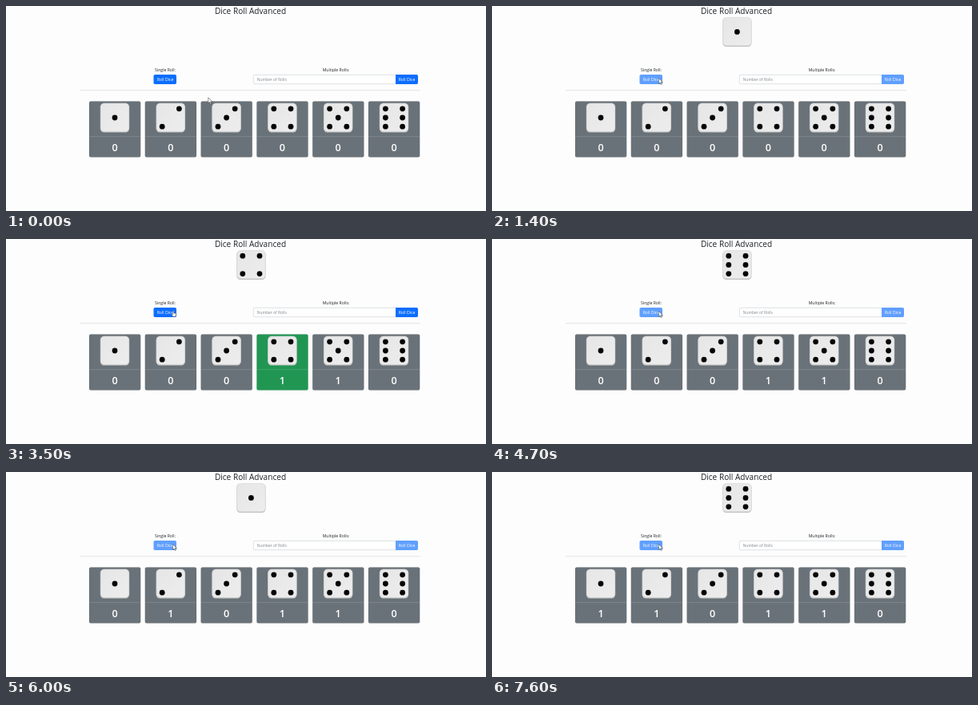
Animation of 600 by 257 pixels, one loop 7700 ms. Source, as an HTML page:

```html
<!DOCTYPE html>
<html lang="en">
<head>
<meta charset="utf-8">
<title>Dice Roll</title>
<style>
  html, body { margin: 0; width: 100%; height: 100%; overflow: hidden; background: #fdfdfd; }
  svg { display: block; font: 5.15px "Open Sans", "Noto Sans", sans-serif; }
  .mid { text-anchor: middle; }
  .title { font-size: 10.1px; font-weight: 500; }
  .count { font-size: 12.6px; font-weight: 600; fill: #fff; }
</style>
</head>
<body>
<svg id="stage" width="600" height="257" viewBox="0 0 600 257" fill="#212529">
  <defs>
    <linearGradient id="face" x1="0" y1="0" x2="1" y2="1">
      <stop offset="0" stop-color="#e6e6e6"/>
      <stop offset="1" stop-color="#ededed"/>
    </linearGradient>
  </defs>
  <text class="mid title" x="305.5" y="10">Dice Roll Advanced</text>
  <text class="mid" x="199" y="82">Single Roll:</text>
  <text class="mid" x="412.5" y="82">Multiple Rolls:</text>
  <g id="single">
    <rect x="184.5" y="86" width="28.5" height="12" rx="1.8"/>
    <text class="mid" x="199" y="94" fill="#fff">Roll Dice</text>
  </g>
  <path d="M487 86.3H311a1.7 1.7 0 0 0-1.7 1.7v8a1.7 1.7 0 0 0 1.7 1.7H487" fill="#fff" stroke="#ced4da" stroke-width=".7"/>
  <text x="313.8" y="94" font-size="4.9" fill="#7d848a">Number of Rolls</text>
  <g id="multi">
    <path d="M487 86h26.2a1.8 1.8 0 0 1 1.8 1.8v8.4a1.8 1.8 0 0 1-1.8 1.8H487z" fill="#0d6efd"/>
    <text class="mid" x="501" y="94" fill="#fff">Roll Dice</text>
  </g>
  <path d="M92 105.7H518" stroke="#dcdddd" stroke-width=".8"/>
  <g id="cards"></g>
  <g id="rolled"></g>
  <path id="arrow" d="M0 0V7L1.7 5.5 2.8 8 3.9 7.5 2.8 5.1H5z" fill="#fff" stroke="#444" stroke-width=".55"/>
  <path id="hand" d="M-.6 0Q0-.8.6 0V2.6L2.8 3.1Q3.5 3.3 3.4 4.2L2.8 7H-.8L-2.4 4.4Q-2.2 3.5-.6 4.4z" fill="#fff" stroke="#333" stroke-width=".5"/>
</svg>
<script>
  const LOOP = 7700, STEP = 100, FADE = 150;
  // Each roll: click time, time it settles, faces shown while rolling, result.
  const rolls = [
    [800, 1600, "36425413", 5],
    [2600, 3300, "6253144", 4],
    [4000, 4900, "315241366", 2],
    [5600, 6400, "24631523", 1],
    [7000, 7800, "4253126", 6]
  ].map(([click, settle, faces, result]) => ({ click, settle, faces, result }));

  const get = id => document.getElementById(id);
  const clamp = v => Math.max(0, Math.min(1, v));
  const show = (node, on) => node.setAttribute("visibility", on ? "visible" : "hidden");

  function die(n, x, y) {
    const spots = [];
    if (n % 2) spots.push([0, 0]);
    if (n > 1) spots.push([1, -1], [-1, 1]);
    if (n > 3) spots.push([-1, -1], [1, 1]);
    if (n === 6) spots.push([-1, 0], [1, 0]);
    const pips = spots.map(([u, v]) =>
      `<circle cx="${x + u * 10.6}" cy="${y + v * 11.2}" r="3.4" fill="#050505"/>`).join("");
    return `<rect x="${x - 18}" y="${y - 17.4}" width="36" height="36" rx="4.5" fill="#bebebe"/>
      <rect x="${x - 17.8}" y="${y - 18}" width="35.6" height="35.4" rx="4.5" fill="url(#face)" stroke="#d3d3d3" stroke-width=".6"/>${pips}`;
  }

  get("cards").innerHTML = [1, 2, 3, 4, 5, 6].map(n => {
    const x = 136 + (n - 1) * 69.8;
    return `<rect class="card" x="${x - 32}" y="119.6" width="64.2" height="70" rx="1.8" stroke="#000" stroke-opacity=".12" stroke-width=".6"/>
      <path d="M${x - 32} 163.6h64.2" stroke="#fff" stroke-opacity=".18" stroke-width=".7"/>
      ${die(n, x, 140)}<text class="mid count" x="${x}" y="182">0</text>`;
  }).join("");
  const cards = [...document.querySelectorAll(".card")];
  const counts = [...document.querySelectorAll(".count")];
  const singleBox = get("single").querySelector("rect");
  let shown = -1;

  function draw(t) {
    const roll = rolls.filter(r => t >= r.click).pop();
    const rolling = !!roll && t < roll.settle;
    const settled = !!roll && !rolling;

    cards.forEach((card, i) => {
      card.setAttribute("fill", settled && roll.result === i + 1 ? "#219653" : "#6a7279");
      counts[i].textContent = rolls.filter(r => t >= r.settle && r.result === i + 1).length;
    });

    const face = !roll ? 0 : settled ? roll.result : +roll.faces[Math.floor((t - roll.click) / STEP)];
    if (face !== shown) {
      get("rolled").innerHTML = face ? die(face, 306.4, 32.4) : "";
      shown = face;
    }

    // The hover tint fades in while the button is free and fades out after a click.
    const hover = rolling ? 1 - clamp((t - roll.click) / FADE)
      : clamp((t - (roll ? roll.settle + 350 : 500)) / FADE);
    singleBox.setAttribute("fill", `rgb(${13 - 2 * hover},${110 - 16 * hover},${253 - 38 * hover})`);
    for (const id of ["single", "multi"]) get(id).setAttribute("opacity", rolling ? .65 : 1);

    const p = clamp((t - 50) / 550), k = p * p * (3 - 2 * p);
    const x = 252.8 - 44.3 * k, y = 114.8 - 24.3 * k;
    const over = !rolling && x < 213 && y < 98;
    get("arrow").setAttribute("transform", `translate(${x} ${y})`);
    get("hand").setAttribute("transform", `translate(${x + .8} ${y - .3})`);
    show(get("arrow"), !over);
    show(get("hand"), over);
  }

  const start = performance.now();
  function tick() {
    draw((performance.now() - start) % LOOP);
    requestAnimationFrame(tick);
  }
  tick();
</script>
</body>
</html>
```
